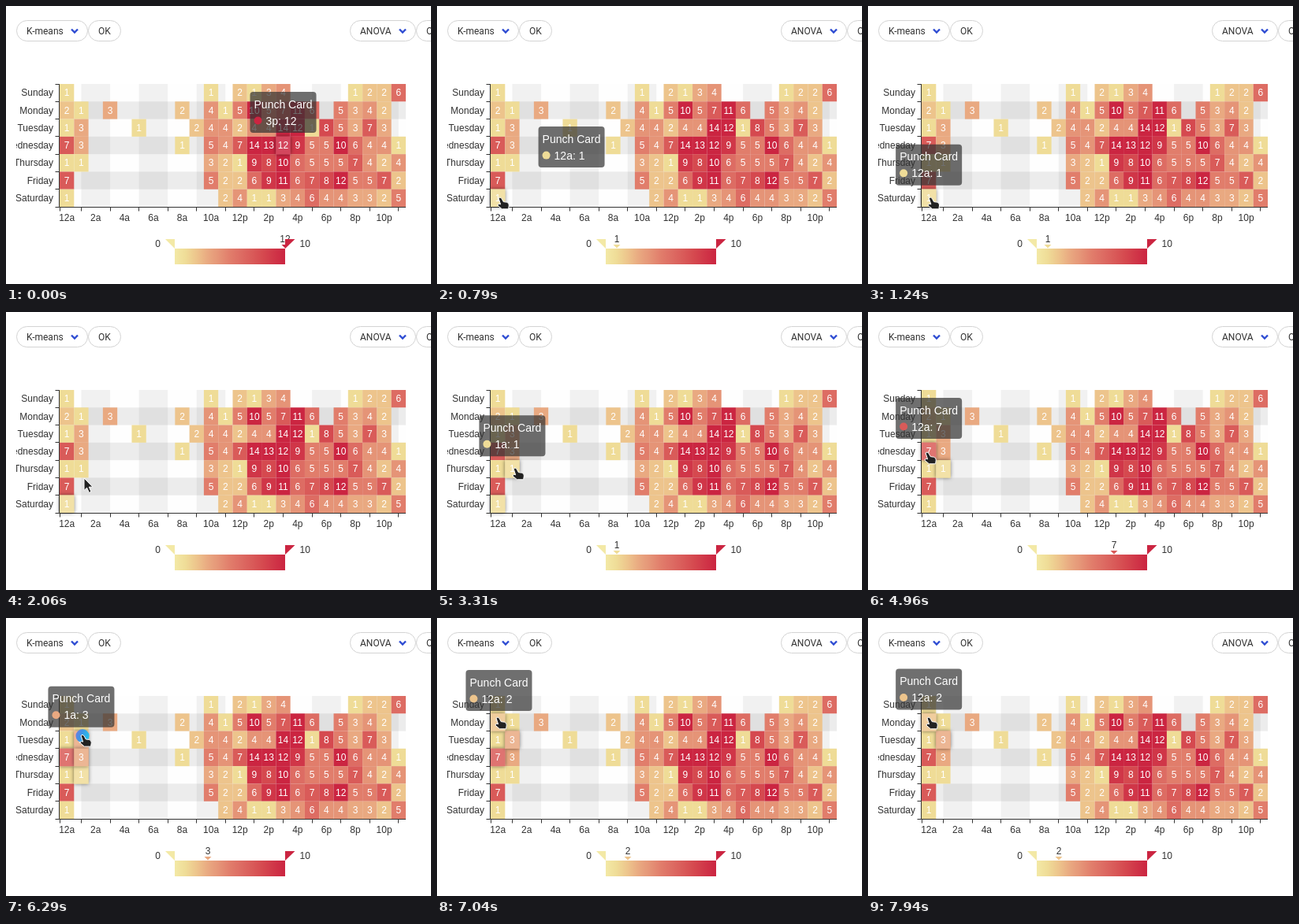
These frames come from a looping animation (539x353 px, 8000 ms). An HTML page:

```html
<!DOCTYPE html>
<html lang="en">
<head>
<meta charset="utf-8">
<title>Punch Card</title>
<style>
  html, body { margin: 0; width: 100%; height: 100%; overflow: hidden; background: #fff; }
  svg { display: block; }
  text { font: 12px "Liberation Sans", Arial, sans-serif; fill: #333; }
  .bar text { font: 12px Roboto, sans-serif; }
  .num { fill: #fff; text-anchor: middle; }
  .mid { text-anchor: middle; }
  .end { text-anchor: end; }
  .tip text { font-size: 14px; fill: #fff; }
</style>
</head>
<body>
<svg id="stage" width="539" height="353" viewBox="0 0 539 353">
  <defs>
    <filter id="shadow" x="-60%" y="-60%" width="220%" height="220%">
      <feDropShadow dx="0" dy="0" stdDeviation="2.8" flood-color="#000" flood-opacity=".55"/>
    </filter>
    <clipPath id="chartClip"><rect x="13" y="60" width="526" height="293"/></clipPath>
    <linearGradient id="scale"></linearGradient>
    <linearGradient id="ball" x1="0" y1="0" x2="1" y2=".4">
      <stop offset="0" stop-color="#7b78dc"/>
      <stop offset=".45" stop-color="#3f93e6"/>
      <stop offset="1" stop-color="#25c0ea"/>
    </linearGradient>
  </defs>
</svg>
<script>
const LOOP = 8000;
const X0 = 68, X1 = 507, Y0 = 99, Y1 = 255;
const CW = (X1 - X0) / 24, RH = (Y1 - Y0) / 7;
const days = ["Sunday", "Monday", "Tuesday", "Wednesday", "Thursday", "Friday", "Saturday"];
// One hex digit per hour, a dot for an empty cell
const rows = [
  "1.........1.2134....1226",
  "21.3....2.415a57b6.5342.",
  "13...1...244244ec185373.",
  "73......1.547edc955a6441",
  "11........32198a65557424",
  "7.........52269b678c5572",
  "1..........2411346443325"
];
const ramp = ["#f3e9a6", "#efdc97", "#edc48c", "#e9a981", "#e59477", "#e17d6b",
  "#dd6c63", "#d95b59", "#d5494f", "#d03648", "#cb2541"];

const color = v => ramp[Math.min(v, 10)];
const value = (c, r) => parseInt(rows[r][c], 16);
const hour = c => (c % 12 || 12) + (c < 12 ? "a" : "p");
const cx = c => X0 + (c + .5) * CW;
const cy = r => Y0 + (r + .5) * RH;

const stage = document.getElementById("stage");

function el(parent, tag, attrs, text) {
  const node = document.createElementNS("http://www.w3.org/2000/svg", tag);
  for (const k in attrs) node.setAttribute(k, attrs[k]);
  if (text !== undefined) node.textContent = text;
  parent.appendChild(node);
  return node;
}
const show = (node, on) => node.setAttribute("display", on ? "inline" : "none");
const place = (node, x, y) => node.setAttribute("transform", `translate(${x.toFixed(2)} ${y.toFixed(2)})`);

// Toolbar
const bar = el(stage, "g", { class: "bar" });
function pill(x, w, label, menu) {
  el(bar, "rect", { x: x + .5, y: 18.5, width: w - 1, height: 26, rx: 13, fill: "#fff", stroke: "#d3d3d3" });
  el(bar, "text", { x: x + 13, y: 36 }, label);
  if (menu) el(bar, "path", {
    d: `M${x + w - 21} 29.5l4 4 4-4`, fill: "none", stroke: "#2d4bd2", "stroke-width": 2.4
  });
}
pill(13, 91, "K-means", true);
pill(104, 42, "OK");
pill(436, 84, "ANOVA", true);
pill(520, 42, "OK");

// Grid bands, axes and cells
const chart = el(stage, "g", { "clip-path": "url(#chartClip)" });
const band = odd => odd ? "rgba(200,200,200,.35)" : "rgba(250,250,250,.3)";
const edges = [X0];
for (let k = 0; k < 12; k++) edges.push(X0 + CW * (1.5 + 2 * k));
edges.push(X1);
for (let i = 0; i < 13; i++)
  el(chart, "rect", { x: edges[i], y: Y0, width: edges[i + 1] - edges[i], height: Y1 - Y0, fill: band(i % 2) });
for (let r = 0; r < 7; r++)
  el(chart, "rect", { x: X0, y: Y0 + r * RH, width: X1 - X0, height: RH, fill: band(r % 2) });

let axis = `M67.5 ${Y0}V255.5H${X1}`;
for (const x of edges.slice(0, -1)) axis += `M${Math.floor(x) + .5} 255.5v5`;
for (let r = 0; r <= 7; r++) axis += `M67.5 ${Math.floor(Y0 + r * RH) + .5}h-5`;
el(chart, "path", { d: axis, fill: "none", stroke: "#333" });

days.forEach((d, r) => el(chart, "text", { x: 60, y: cy(r) + 4.2, class: "end" }, d));
for (let c = 0; c < 24; c += 2) el(chart, "text", { x: cx(c), y: 273, class: "mid" }, hour(c));

function cell(parent, c, r, lit) {
  const v = value(c, r);
  const box = { x: X0 + c * CW, y: Y0 + r * RH, width: CW, height: RH, fill: color(v) };
  if (lit) box.filter = "url(#shadow)";
  el(parent, "rect", box);
  if (lit) el(parent, "rect", { ...box, fill: "rgba(255,255,255,.15)", filter: "none" });
  el(parent, "text", { x: cx(c), y: cy(r) + 4.2, class: "num" }, v);
}
for (let r = 0; r < 7; r++)
  for (let c = 0; c < 24; c++)
    if (rows[r][c] !== ".") cell(chart, c, r);

// Hovered cells: on = enter, off = leave, gone = tooltip hidden, unlit = shadow cleared
const hovers = [
  { c: 15, r: 3, on: -1000, off: 330, gone: 715, unlit: 715 },
  { c: 0, r: 6, on: 715, off: 1520, gone: 1640, unlit: 4700 },
  { c: 1, r: 4, on: 2230, off: 3450, gone: 3560, unlit: 6310, wait: 45 },
  { c: 0, r: 3, on: 3920, off: 5310, gone: 5310, unlit: 7670 },
  { c: 1, r: 2, on: 5310, off: 6880, gone: 6880, unlit: LOOP },
  { c: 0, r: 1, on: 6880, off: LOOP, gone: LOOP, unlit: LOOP }
];
const lights = [...hovers, { c: 1, r: 3, on: 5260, unlit: 6310 }].map(h => {
  const g = el(chart, "g", {});
  cell(g, h.c, h.r, true);
  return { ...h, g };
});

// Colour scale
ramp.forEach((c, i) => el(document.getElementById("scale"), "stop", { offset: i / 10, "stop-color": c }));
el(stage, "rect", { x: 214, y: 308, width: 140, height: 20, fill: "url(#scale)" });
const mark = el(stage, "g", {});
const markText = el(mark, "text", { y: 300, class: "mid" });
const markArrow = el(mark, "path", { d: "M-4.5 303h9l-4.5 4.5z" });
el(stage, "path", { d: "M202 296h12v12z", fill: ramp[0] });
el(stage, "path", { d: "M354 296h12.5l-12.5 12z", fill: ramp[10] });
el(stage, "text", { x: 196, y: 306, class: "end" }, "0");
el(stage, "text", { x: 372.5, y: 306 }, "10");

// Tooltip
const tip = el(stage, "g", { class: "tip" });
el(tip, "rect", { width: 84, height: 52, rx: 4, fill: "rgba(50,50,50,.7)" });
el(tip, "text", { x: 5, y: 20.5 }, "Punch Card");
const tipDot = el(tip, "circle", { cx: 10, cy: 36.5, r: 5 });
const tipText = el(tip, "text", { x: 20, y: 41.5 });

// Pointer
const ball = el(stage, "circle", { fill: "url(#ball)" });
const pointer = el(stage, "g", { fill: "#222", stroke: "#fff", "stroke-width": 1, "stroke-linejoin": "round" });
const arrow = el(pointer, "path", { d: "M0 0V15.5L3.6 12.2 6.4 18.4 9 17.2 6.3 11.2H11Z" });
const hand = el(pointer, "path", {
  d: "M-2 0Q0-2.2 2 .3L4.2 4.6 8.5 5.2Q11.5 6 11.3 9L10.6 13.8H2.4L-2.6 9.6Q-3.6 7.6-1.4 7.4L.6 7.8Z"
});

// Pointer tip: time, x, y
const path = [
  [540, 130, 287], [715, 82, 248], [790, 80, 244], [1410, 79, 244], [1700, 100, 236],
  [2060, 99, 211], [2230, 99, 207], [2600, 98, 199], [2920, 98, 199], [3110, 101, 196],
  [3310, 99, 199], [3450, 106, 196], [3690, 109, 190], [3920, 80, 182], [4080, 75, 179],
  [5180, 75, 179], [5310, 97, 150], [6780, 97, 149], [6880, 79, 130], [6980, 77, 127]
];
const clicks = [4680, 6290, 7650];

function pointerAt(t) {
  const i = path.findIndex(p => p[0] > t);
  if (i < 0) return path[path.length - 1].slice(1);
  const a = path[Math.max(0, i - 1)], b = path[i];
  const k = i ? (t - a[0]) / (b[0] - a[0]) : 0;
  return [a[1] + (b[1] - a[1]) * k, a[2] + (b[2] - a[2]) * k];
}

// cubic-bezier(.23, 1, .32, 1)
function ease(x) {
  if (x <= 0) return 0;
  if (x >= 1) return 1;
  let lo = 0, hi = 1;
  for (let i = 0; i < 22; i++) {
    const s = (lo + hi) / 2, q = 1 - s;
    if (3 * q * q * s * .23 + 3 * q * s * s * .32 + s * s * s < x) lo = s; else hi = s;
  }
  return 1 - (1 - lo) ** 3;
}

const tipHome = h => [cx(h.c) - 42, cy(h.r) - 68];

function draw(t) {
  let n = 0;
  while (n + 1 < hovers.length && hovers[n + 1].on <= t) n++;
  const h = hovers[n], v = value(h.c, h.r), active = t < h.off;

  for (const l of lights) show(l.g, t >= l.on && t < l.unlit);

  show(mark, active);
  place(mark, 214 + Math.min(v, 10) * 14, 0);
  markText.textContent = v;
  markArrow.setAttribute("fill", color(v));

  const to = tipHome(h), from = n ? tipHome(hovers[n - 1]) : to;
  const k = ease((t - h.on) / 400);
  show(tip, t < h.gone && t >= h.on + (h.wait || 0));
  place(tip, from[0] + (to[0] - from[0]) * k, from[1] + (to[1] - from[1]) * k);
  tipDot.setAttribute("fill", color(v));
  tipText.textContent = `${hour(h.c)}: ${v}`;

  const [px, py] = pointerAt(t);
  show(pointer, t >= path[0][0]);
  show(hand, active);
  show(arrow, !active);
  place(pointer, px, py);

  const click = clicks.find(c => t >= c && t < c + 280);
  show(ball, click !== undefined);
  if (click !== undefined) {
    const p = (t - click) / 280;
    ball.setAttribute("cx", px);
    ball.setAttribute("cy", py + .5);
    ball.setAttribute("r", 8.5 + 5.5 * p);
    ball.setAttribute("opacity", 1 - p);
  }
}

const start = performance.now();
function tick() {
  draw((performance.now() - start) % LOOP);
  requestAnimationFrame(tick);
}
tick();
</script>
</body>
</html>
```
